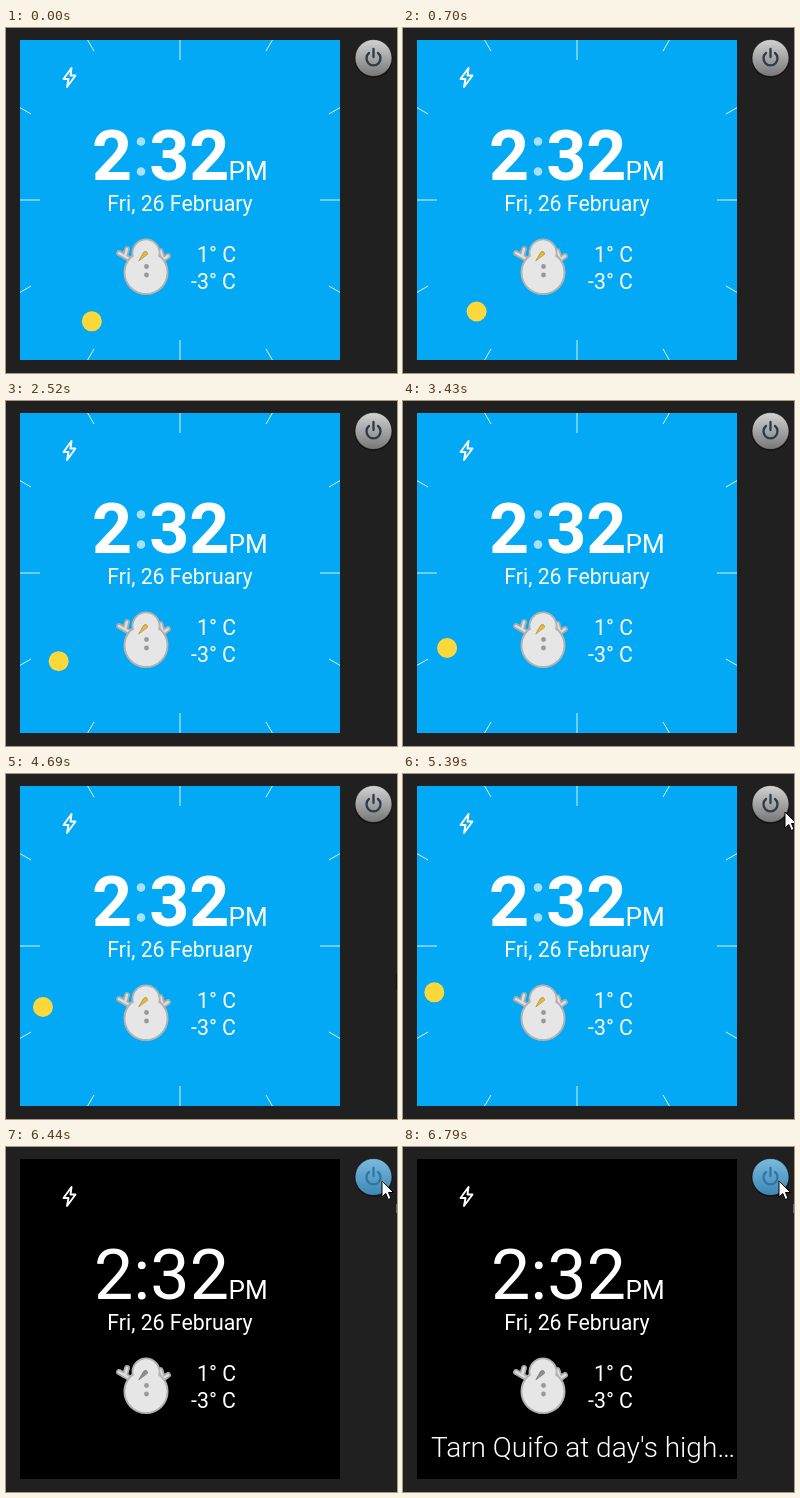
Recreate the animation shown at these times as an HTML page. Size 391 by 345 pixels, loop 8000 ms.

```html
<!DOCTYPE html>
<html lang="en">
<head>
<meta charset="utf-8">
<title>Watch face</title>
<style>
  html, body { margin: 0; width: 100%; height: 100%; overflow: hidden; background: #202020; }
  svg { display: block; width: 391px; height: 345px; }
  text { font-family: Roboto, sans-serif; fill: #fff; }
  .time { font-size: 70px; font-weight: 700; }
  .small { font-size: 21.3px; }
  .news { font-size: 28px; font-weight: 300; font-stretch: 75%; }
  .ambient .time { font-weight: 400; }
  .ambient .active, .ambient .bold { display: none; }
  svg:not(.ambient) .thin { display: none; }
  .ambient #nose { fill: #8c8c8c; stroke: #777; }
</style>
</head>
<body>
<svg id="stage" viewBox="0 0 391 345">
  <defs>
    <linearGradient id="steel" x2="0" y2="1"><stop stop-color="#d2d2d2"/><stop offset="1" stop-color="#777"/></linearGradient>
    <linearGradient id="blue" x2="0" y2="1"><stop stop-color="#7bbade"/><stop offset="1" stop-color="#3c87b3"/></linearGradient>
    <linearGradient id="pressed" x2="0" y2="1"><stop stop-color="#4f97c0"/><stop offset="1" stop-color="#3679a2"/></linearGradient>
    <clipPath id="screen"><rect x="14" y="12" width="320" height="320"/></clipPath>
  </defs>

  <rect x="14" y="12" width="320" height="320"/>
  <g class="active">
    <rect x="14" y="12" width="320" height="320" fill="#03a9f4"/>
    <g id="ticks" stroke="#fff" stroke-opacity=".85" clip-path="url(#screen)"></g>
    <circle id="second" r="10" fill="#fdd83a"/>
  </g>

  <path d="M65.5 40 57.5 51H62.5L61 59 69.5 47.5H64.5Z" fill="none" stroke="#fff" stroke-width="1.9" stroke-linejoin="round"/>

  <g class="time bold">
    <text x="86" y="152">2</text>
    <text x="143.2" y="152">32</text>
    <g id="colon" fill="#fff"><circle cx="135" cy="113.5" r="4.3"/><circle cx="135" cy="143.5" r="4.3"/></g>
  </g>
  <text class="time thin" x="88" y="152">2:32</text>
  <text x="222.5" y="152" font-size="26">PM</text>
  <text class="small" x="174" y="183" text-anchor="middle">Fri, 26 February</text>
  <text class="small" x="230" y="234" text-anchor="end">1° C</text>
  <text class="small" x="230" y="261" text-anchor="end">-3° C</text>

  <g stroke-linecap="round" stroke-linejoin="round">
    <g id="arms" fill="none">
      <path id="arm" d="M127 233 113 225M119 228.5 121 221M155 233 162 228M157 231 154.5 223" stroke="#aaa" stroke-width="5.5"/>
      <use href="#arm"/>
      <path d="M127 233 113 225M119 228.5 121 221M155 233 162 228M157 231 154.5 223" stroke="#dedede" stroke-width="2.5"/>
    </g>
    <g fill="#e6e6e6" stroke="#b2b2b2" stroke-width="2">
      <circle cx="140" cy="244.5" r="21.5"/>
      <circle cx="140" cy="225" r="13.5"/>
    </g>
    <g fill="#e6e6e6"><circle cx="140" cy="244.5" r="20.3"/><circle cx="140" cy="225" r="12.4"/></g>
    <path id="nose" d="M133 232.5 137.5 224.5Q141 221.5 141.5 226Z" fill="#e5b83c" stroke="#b9902f" stroke-width=".8"/>
    <g fill="#999"><circle cx="140.5" cy="238.5" r="2.4"/><circle cx="140.5" cy="247" r="2.4"/></g>
  </g>

  <g clip-path="url(#screen)"><text id="news" class="news" x="28">Tarn Quifo at day's high…</text></g>

  <circle cx="367.5" cy="30.7" r="19" fill="#111"/>
  <circle id="button" cx="367.5" cy="30" r="18.3" stroke="#000" stroke-opacity=".25"/>
  <path id="power" d="M363 25A7 7 0 1 0 372 25M367.5 21V29" fill="none" stroke-width="2.3" stroke-linecap="round"/>
  <rect id="edge" x="390" y="57" width="1" height="9" fill="#666"/>
  <path id="cursor" d="M0 0V16L3.8 12.5 6.3 18.5 9 17.3 6.5 11.5H11.5Z" fill="#fff" stroke="#000"/>
</svg>

<script>
const LOOP = 8000, STEP = 70, SECOND = 900, FIRST_TICK = 220;
const AMBIENT = 6440, HOVER = 5880, NEWS = 6650;
const $ = id => document.getElementById(id);
const polar = (deg, r) => {
  const a = deg * Math.PI / 180;
  return [174 + r * Math.sin(a), 172 - r * Math.cos(a)];
};

// time, x, y of the pointer's tip
const pointer = [
  [0, 400, 348], [3640, 372, 348], [3710, 372, 337], [3850, 372, 348],
  [3920, 400, 348], [4620, 400, 200], [4690, 391, 200], [5040, 384, 120],
  [5390, 382, 38], [5460, 382, 38], [5530, 384, 36], [5670, 392, 34],
  [5810, 392, 34], [5880, 376, 34], [LOOP, 376, 34]
];

for (let deg = 0; deg < 360; deg += 30) {
  const [inner, outer] = deg % 90 ? [172, 186] : [140, 160];
  const [x1, y1] = polar(deg, inner), [x2, y2] = polar(deg, outer);
  $('ticks').innerHTML += `<line x1="${x1}" y1="${y1}" x2="${x2}" y2="${y2}"/>`;
}

function pointerAt(t) {
  const i = pointer.findIndex(p => p[0] > t);
  const [t0, x0, y0] = pointer[i - 1], [t1, x1, y1] = pointer[i];
  const k = (t - t0) / (t1 - t0);
  return [x0 + (x1 - x0) * k, y0 + (y1 - y0) * k];
}

function draw(now) {
  const t = Math.floor(now % LOOP / STEP) * STEP;
  const since = t - FIRST_TICK + SECOND;
  const [x, y] = polar((36 + Math.floor(since / SECOND)) * 6, 150);
  $('second').setAttribute('cx', x);
  $('second').setAttribute('cy', y);
  $('colon').setAttribute('opacity', since % SECOND < SECOND / 2 ? 1 : 0.65);
  $('stage').classList.toggle('ambient', t >= AMBIENT);

  const hover = t >= HOVER, down = t >= 5950 && t < 6090;
  $('button').setAttribute('fill', `url(#${down ? 'pressed' : hover ? 'blue' : 'steel'})`);
  $('power').setAttribute('stroke', hover ? '#2f78a4' : '#2d3b46');
  $('edge').setAttribute('opacity', t >= 5530 ? 1 : 0);
  $('cursor').setAttribute('transform', `translate(${pointerAt(t)})`);

  $('news').setAttribute('opacity', t >= NEWS ? 1 : 0);
  $('news').setAttribute('y', 310 + Math.max(0, 40 * (6790 - t) / 210));
  requestAnimationFrame(draw);
}
requestAnimationFrame(draw);
</script>
</body>
</html>
```
